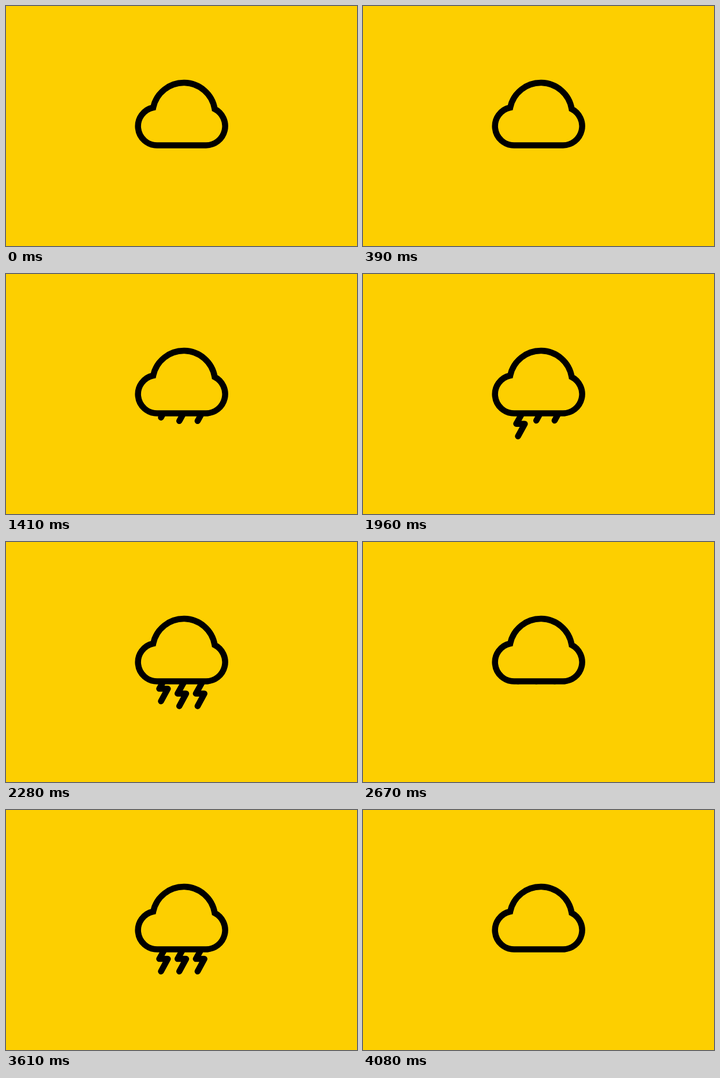
These frames come from a looping animation (608x416 px, 4160 ms). An HTML page:

```html
<!DOCTYPE html>
<html lang="en">
<head>
<meta charset="utf-8">
<title>Thunder cloud</title>
<style>
html, body { margin: 0; width: 100%; height: 100%; overflow: hidden; background: #fdcf00; }
svg { display: block; width: 608px; height: 416px; }
path { fill: none; stroke: #000; stroke-width: 10.5; }
#bolts path { stroke-linecap: round; stroke-linejoin: round; }
</style>
</head>
<body>
<svg viewBox="0 0 608 416">
  <clipPath id="below"><rect y="242" width="608" height="174"/></clipPath>
  <g id="bolts" clip-path="url(#below)">
    <path d="M9.5-44L-3-21.7H11.8L0 0"/>
    <path d="M9.5-44L-3-21.7H11.8L0 0"/>
    <path d="M9.5-44L-3-21.7H11.8L0 0"/>
  </g>
  <path d="M262 241.5A33.1 33.1 0 0 1 255 176A54.2 54.2 0 0 1 361.5 178.5A33.35 33.35 0 0 1 346.5 241.5Z"/>
</svg>
<script>
const LOOP = 4160, STEP = 78.5, STRIKES = 3, REST = 239, DEPTH = 45.5;
const bolts = document.querySelectorAll('#bolts path');

function smooth(x) {
  x = Math.min(1, Math.max(0, x));
  return x * x * (3 - 2 * x);
}

// The bolts start late and catch up with the beat, the first one soonest
function tipY(i, u) {
  const lag = i ? 0.22 : 0.25, catchUp = i ? 0.48 : 0.28;
  const late = lag * (1 - smooth((u - catchUp) / 0.16));
  const phase = Math.max(0, STRIKES * u - late);
  return REST + DEPTH * (1 - Math.cos(2 * Math.PI * phase)) / 2;
}

function draw(now) {
  const t = Math.floor((now % LOOP + 5) / STEP) * STEP % LOOP;
  bolts.forEach((bolt, i) =>
    bolt.setAttribute('transform', `translate(${268.5 + 31.7 * i} ${tipY(i, t / LOOP)})`));
  requestAnimationFrame(draw);
}

draw(0);
</script>
</body>
</html>
```
